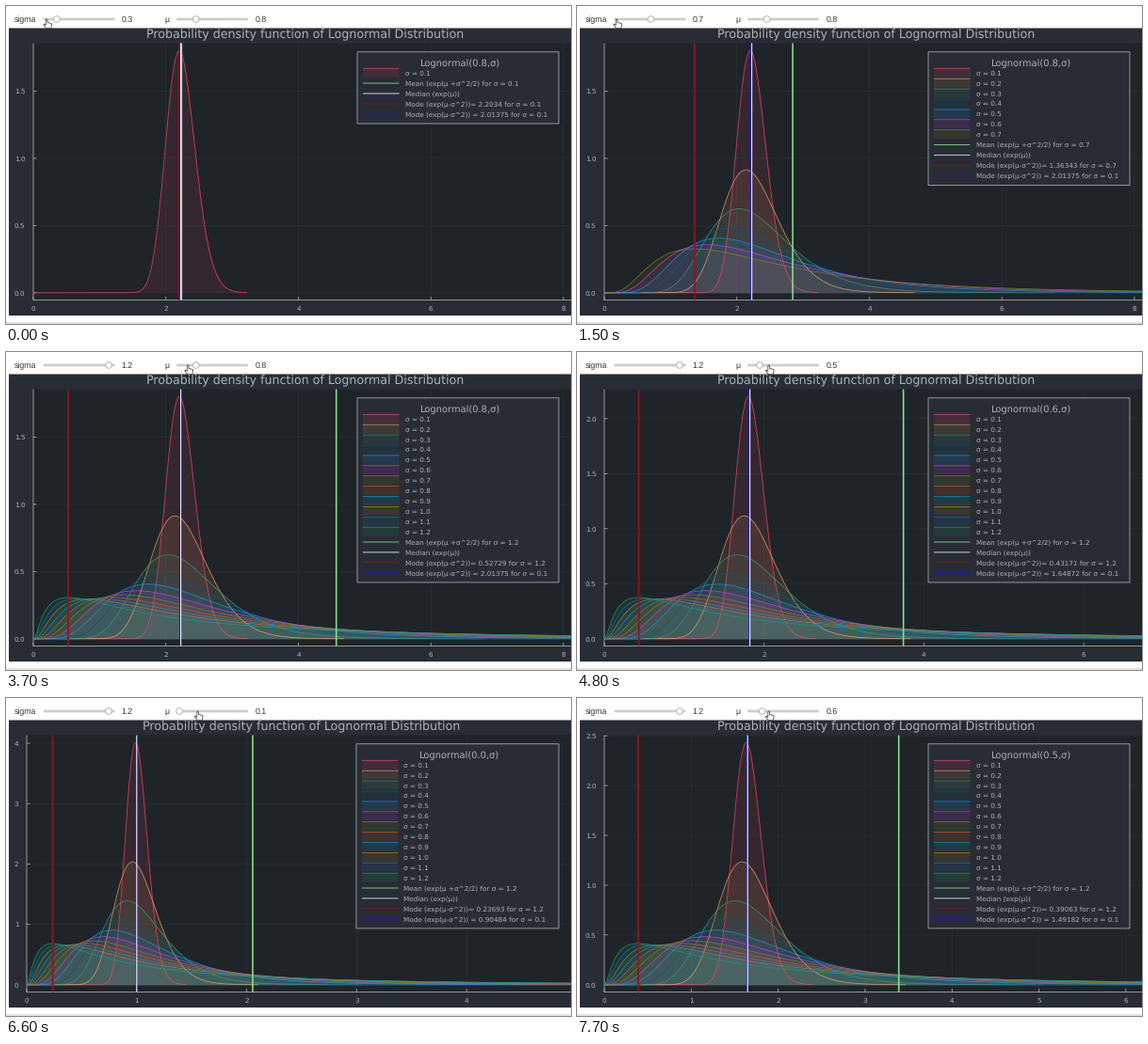
A matplotlib script for the animation above (7800 ms loop, 600 px wide and 338 px high).

```python
import numpy as np
import matplotlib.pyplot as plt
from matplotlib.animation import FuncAnimation
from matplotlib.patches import Circle, FancyBboxPatch, Polygon, Rectangle

W, H, DPI = 600, 338, 100
PT = 72 / DPI
FRAMES, STEP = 78, 100

BG, INSIDE, FG = "#282C34", "#1F2429", "#ADB2B7"
PALETTE = ["#FE4365", "#ECA25C", "#3F9778", "#005D7F", "#0D9BF2", "#D33CF0",
           "#828A12", "#E0561B", "#0A9BCB", "#B98314", "#1572D2", "#12AD62"]
MEAN, MEDIAN, MODE, MODE_1 = "#86E08A", "#F4F4FF", "#8E151C", "#1414E0"

TOP, BASE, BOTTOM, RIGHT = 39.5, 304.8, 312.5, 606
PEAK_HEIGHT = 257.4
ROW = 10.9

# Times (ms) at which each value moves by one tenth.
SIGMA_LABEL = [400, 800, 1100, 1400, 1700, 2000, 2200, 2500, 2800]
SIGMA_PLOT = [200, 500, 900, 1100, 1300, 1500, 1900, 2200, 2400, 2700, 3000]
MU_LABEL_DOWN = [4000, 4300, 4600, 4900, 5200, 5500, 5800, 6100]
MU_LABEL_UP = [6500, 6800, 7000, 7200, 7400, 7600]
MU_PLOT_DOWN = [4200, 4500, 4900, 5200, 5500, 5800, 6100, 6400]
MU_PLOT_UP = [6700, 6900, 7100, 7300, 7600]

plt.rcParams["text.hinting"] = "none"
fig = plt.figure(figsize=(W / DPI, H / DPI), dpi=DPI, facecolor="white")
ax = fig.add_axes([0, 0, 1, 1])


def passed(times, t):
    return sum(t >= s for s in times)


def text(x, y, s, size=7.22, ha="left", color=FG, font="DejaVu Sans"):
    ax.text(x, y, s, fontsize=size * PT, ha=ha, va="baseline", color=color,
            family=font, zorder=9)


def line(x, y, color, width=1.0, **kw):
    ax.plot(x, y, color=color, lw=width * PT, solid_capstyle="butt", snap=False, **kw)


def box(x0, y0, x1, y1, color, **kw):
    kw.setdefault("lw", 0)
    ax.add_patch(Rectangle((x0, y0), x1 - x0, y1 - y0, fc=color, snap=False, **kw))


def pdf(x, mu, s):
    return np.exp(-(np.log(x) - mu) ** 2 / (2 * s * s)) / (x * s * np.sqrt(2 * np.pi))


def slider(x, name, name_x, value, knob):
    ui = dict(size=8.8, color="#333333", font="Liberation Sans")
    text(name_x, 17.2, name, **ui)
    text(x + 84.7, 17.2, f"{value:.1f}", **ui)
    ax.add_patch(FancyBboxPatch((x + 1.4, 12.6), 76.2, 2.8, fc="#CDCDCD", ec="none",
                                boxstyle="round,pad=0,rounding_size=1.4"))
    ax.add_patch(Circle((knob, 14), 3.3, fc="white", ec="#A8A8A8", lw=0.8 * PT))


def hand(x, y):
    pts = np.array([(-1.7, 0.4), (-0.9, -0.4), (0, 0.4), (0, 3.2), (4.2, 4.2),
                    (4.6, 5.2), (3.8, 9.4), (-1.2, 9.4), (-4.2, 5.6),
                    (-3.6, 4.8), (-1.7, 6)])
    ax.add_patch(Polygon(pts + (x, y), fc="white", ec="#444444", lw=0.8 * PT,
                         joinstyle="round", zorder=10))


def draw_axes(left, mu, sx, sy):
    for v in range(0, 10, 2 if mu > 0.55 else 1):
        x = left + v * sx
        if x < RIGHT:
            line([x, x], [TOP, BOTTOM], FG, 0.6, alpha=0.08)
            line([x, x], [BOTTOM, BOTTOM - 3.5], FG, 0.8)
            text(x, 324.4, str(v), ha="center")
    step = 0.5 if mu > 0.35 else 1
    for v in np.arange(0, 5, step):
        y = BASE - v * sy
        if y > TOP:
            line([left, RIGHT], [y, y], FG, 0.6, alpha=0.08)
            line([left, left + 3.5], [y, y], FG, 0.8)
            text(left - 8.5, y + 2.7, f"{v:.1f}" if step < 1 else f"{v:.0f}", ha="right")
    line([left, left, RIGHT], [TOP, BOTTOM, BOTTOM], FG, 0.8)


def draw_legend(left, mu, sigma, n):
    x = 373 if left == 29 else 372
    bottom = 71 + ROW * (n + 3) + 10.4
    box(x, 48.8, 587, bottom, BG, ec=FG, lw=0.8 * PT, zorder=5)
    text(x + 109, 63.6, f"Lognormal({mu:.1f},σ)", 9.92, "center")
    x0, x1 = x + 6, x + 44.5
    y = 71
    for i in range(n):
        box(x0, y - 4.7, x1, y + 4.7, PALETTE[i], alpha=0.12, zorder=6)
        line([x0, x1], [y - 4.7, y - 4.7], PALETTE[i], 0.8, alpha=0.85, zorder=7)
        text(x + 50.5, y + 2.7, f"σ = {(i + 1) / 10}")
        y += ROW
    mode, mode_1 = round(np.exp(mu - sigma ** 2), 5), round(np.exp(mu - 0.1), 5)
    rows = [(MEAN, f"Mean (exp(μ +σ^2/2) for σ = {sigma}"),
            (MEDIAN, "Median (exp(μ))"),
            (MODE, f"Mode (exp(μ-σ^2))= {mode} for σ = {sigma}"),
            (MODE_1, f"Mode (exp(μ-σ^2)) = {mode_1} for σ = 0.1")]
    for color, label in rows:
        line([x0, x1], [y + 0.2, y + 0.2], color, 0.95, alpha=0.85, zorder=7)
        text(x + 50.5, y + 2.7, label)
        y += ROW


def draw_plot(mu, n):
    sigma = n / 10
    left = 29 if mu > 0.35 else 22
    sx = (RIGHT - left) / (5 * (1 + mu * mu))
    sy = PEAK_HEIGHT / pdf(np.exp(mu - 0.01), mu, 0.1)
    box(3, 23.5, W, 329, BG)
    box(left, TOP, W, BOTTOM, INSIDE)
    text((left + RIGHT) / 2, 34.5, "Probability density function of Lognormal Distribution",
         12.66, "center")
    draw_axes(left, mu, sx, sy)
    for i in range(n):
        s = (i + 1) / 10
        end = min(np.exp(mu + 3.719 * s), 5 * (1 + mu * mu))
        v = np.linspace(1e-6, end, 400)
        x, y = left + v * sx, BASE - pdf(v, mu, s) * sy
        ax.fill_between(x, y, BASE, color=PALETTE[i], alpha=0.1, lw=0)
        line(x, y, PALETTE[i], 0.85, alpha=0.8)
    marks = [(mu + sigma ** 2 / 2, MEAN, 1.6), (mu - sigma ** 2, MODE, 1.8),
             (mu - 0.005, MODE_1, 1.1), (mu, MEDIAN, 1.1)]
    for e, color, width in marks:
        x = left + np.exp(e) * sx
        line([x, x], [TOP, BOTTOM], color, width, zorder=3)
    draw_legend(left, mu, sigma, n)


def draw(i):
    t = i * STEP
    ax.cla()
    ax.set(xlim=(0, W), ylim=(H, 0))
    ax.axis("off")
    line([0, W], [337, 337], "#C4C4C4", 1)

    n = 1 + passed(SIGMA_PLOT, t)
    mu = (8 - passed(MU_PLOT_DOWN, t) + passed(MU_PLOT_UP, t)) / 10
    draw_plot(mu, n)

    sigma = (3 + passed(SIGMA_LABEL, t)) / 10
    mu_ui = (8 - passed(MU_LABEL_DOWN, t) + passed(MU_LABEL_UP, t)) / 10
    slider(38, "sigma", 8.5, sigma, 41.7 + 61.2 * (sigma - 0.1))
    slider(179.5, "μ", 168, mu_ui, 181.6 + 25 * mu_ui)
    hand(np.interp(t, [0, 800, 3000, 3500, 3700, 4200], [44, 43, 43, 194, 194, 204.5]), 14.3)
    return []


anim = FuncAnimation(fig, draw, frames=FRAMES, interval=STEP, init_func=lambda: [],
                     repeat=True, repeat_delay=0, blit=False)
plt.show()
```
